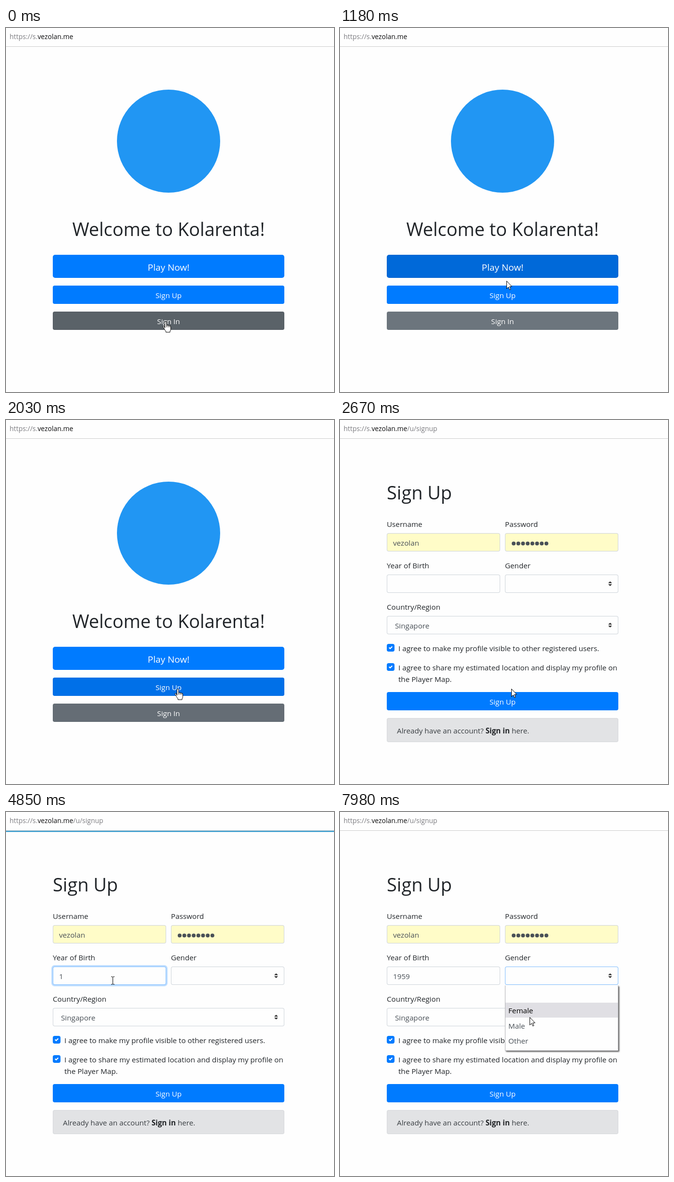
These frames come from a looping animation (680 by 756 pixels, 8000 ms). An HTML page with a canvas:

```html
<!DOCTYPE html>
<html lang="en">
<head>
<meta charset="utf-8">
<title>Sign up</title>
<style>
html, body { margin: 0; width: 100%; height: 100%; overflow: hidden; background: #fefefe; }
canvas { display: block; }
</style>
</head>
<body>
<canvas id="stage" width="680" height="756"></canvas>
<script>
const ctx = document.getElementById('stage').getContext('2d');
const LOOP = 8000, TICK = 90.9;
const PAGE2 = 2490, PRESS = 2400, FOCUS = 3780, OPEN = 7070;
const INK = '#212529', FIELD_INK = '#495057', BORDER = '#ced4da', BLUE = '#007bff';
const BODY = 15.22;

// Pointer hot spot: time, x, y
const PATH = [
  [0, 330, 609], [90, 331, 600], [270, 334, 510], [450, 338, 397], [640, 340, 405],
  [820, 341, 459], [1000, 343, 484], [1180, 345, 525], [1364, 349, 569], [1545, 349, 569],
  [1727, 352, 612], [1818, 354, 600], [1909, 355, 568], [2000, 355, 558], [3180, 355, 558],
  [3455, 300, 470], [3727, 213, 345], [4000, 212, 346], [4640, 221, 350], [6380, 221, 350],
  [6640, 300, 346], [6870, 362, 344], [7180, 362, 344], [7520, 391, 440], [7720, 391, 440],
  [7980, 394, 421]
];
const TYPED = [[4850, '1'], [5040, '9'], [5400, '5'], [5670, '9']];
const CARET = [[3870, 4400], [5130, 5400], [5490, 5940]];
const PRIMARY = { idle: [0, 123, 255], hot: [0, 105, 217], edge: [0, 98, 204] };
const SECONDARY = { idle: [108, 117, 125], hot: [90, 98, 104], edge: [84, 91, 98] };
const BUTTONS = [
  { y: 471, h: 48, label: 'Play Now!', base: 504, size: 19, tint: PRIMARY },
  { y: 535, h: 38, label: 'Sign Up', base: 561, size: BODY, tint: PRIMARY },
  { y: 589, h: 38, label: 'Sign In', base: 615, size: BODY, tint: SECONDARY }
];

const ARROW = new Path2D('M.5 .5V16.5L4.2 13L6.7 18.6L9 17.6L6.6 12H11.4Z');
const HAND = new Path2D('M-.5 14V2.2a1.7 1.7 0 0 1 3.4 0V8.5q1.6-1.2 3.3.4q1.6-1 3.1.5q2.2-.4 2.2 2v5q0 2.5-1.5 4.5v2h-8.5v-2q-2-2-3-4.5l-3-5q0-2.6 2.3-1.4z');
const KNUCKLES = new Path2D('M2.9 8.5v4M6.2 9v3.5M9.3 9.5v3');
const BEAM = new Path2D('M-3 -8H-1L.5 -7L2 -8H4M.5 -7V7M-3 8H-1L.5 7L2 8H4');
const TICKMARK = new Path2D('M6.564 .75l-3.59 3.612-1.538-1.55L0 4.26 2.974 7.25 8 2.193z');
const SORT = new Path2D('M4 0L0 4H8ZM4 10L0 6H8Z');

const clamp = v => Math.max(0, Math.min(1, v));

function pointer(t) {
  t = Math.max(0, Math.floor(t / TICK + 0.02) * TICK);
  let i = 1;
  while (i < PATH.length - 1 && PATH[i][0] < t) i++;
  const a = PATH[i - 1], b = PATH[i], p = clamp((t - a[0]) / (b[0] - a[0]));
  return { x: Math.round(a[1] + (b[1] - a[1]) * p), y: Math.round(a[2] + (b[2] - a[2]) * p) };
}

const over = (b, y) => y >= b.y && y < b.y + b.h;

// Share of a 150 ms window the pointer spent on the button; the page reacts 30 ms late
function hover(b, t) {
  let n = 0;
  for (let k = 0; k < 10; k++) n += over(b, pointer(t - 37.5 - k * 15).y);
  return n / 10;
}

function mix(a, b, k) {
  return `rgb(${a.map((v, i) => Math.round(v + (b[i] - v) * k))})`;
}

function text(s, x, y, color = INK, size = BODY, align = 'left', weight = 400) {
  ctx.font = `${weight} ${size}px "Open Sans", "Noto Sans", sans-serif`;
  ctx.textAlign = align;
  ctx.fillStyle = color;
  ctx.fillText(s, x, y);
  return x + ctx.measureText(s).width;
}

function box(x, y, w, h, fill, r = 4) {
  ctx.beginPath();
  ctx.roundRect(x, y, w, h, r);
  ctx.fillStyle = fill;
  ctx.fill();
}

function outline(x, y, w, h, color, fill, r = 4) {
  box(x, y, w, h, color, r);
  box(x + 1, y + 1, w - 2, h - 2, fill, Math.max(0, r - 1));
}

function glyph(path, x, y, color) {
  ctx.save();
  ctx.translate(x, y);
  ctx.fillStyle = color;
  ctx.fill(path);
  ctx.restore();
}

function addressBar(second) {
  let x = text('https://s.', 7.5, 23, '#7c7c80', 13.95);
  x = text('vezolan.me', x, 23, '#0c0c0d', 13.95);
  if (second) text('/u/signup', x, 23, '#7c7c80', 13.95);
  ctx.fillStyle = '#cccccc';
  ctx.fillRect(0, 38, 680, 1);
}

function welcome(t) {
  ctx.beginPath();
  ctx.arc(337, 235, 107, 0, Math.PI * 2);
  ctx.fillStyle = '#2196f3';
  ctx.fill();
  text('Welcome to Kolarenta!', 337, 432, INK, 37.9, 'center');
  BUTTONS.forEach((b, i) => {
    const k = hover(b, t), { idle, hot, edge } = b.tint;
    const pressed = i === 1 && t >= PRESS;
    if (pressed) box(94, b.y - 3, 486, b.h + 6, 'rgba(0,123,255,.5)', 7);
    outline(97, b.y, 480, b.h, mix(idle, edge, k), pressed ? '#0062cc' : mix(idle, hot, k), b.h / 10);
    text(b.label, 337, b.base, '#fff', b.size, 'center');
  });
}

function select(x, y, w, border) {
  outline(x, y, w, 38, border, '#fefefe');
  glyph(SORT, x + w - 21, y + 14, '#333');
}

function yearField(t) {
  const k = t < OPEN ? clamp((t - FOCUS) / 150) : 1 - clamp((t - OPEN) / 150);
  if (k > 0) box(94, 318, 241, 44, `rgba(0,123,255,${0.25 * k})`, 7);
  outline(97, 321, 235, 38, k > 0.5 ? '#80bdff' : BORDER, '#fefefe');
  const year = TYPED.filter(d => t >= d[0]).map(d => d[1]).join('');
  const end = text(year, 110, 347, FIELD_INK);
  if (CARET.some(c => t >= c[0] && t < c[1])) {
    ctx.fillStyle = FIELD_INK;
    ctx.fillRect(Math.round(end), 330, 1, 21);
  }
}

function checkbox(y) {
  box(97, y, 16, 16, BLUE);
  glyph(TICKMARK, 101, y + 4, '#fff');
}

function dropdown(t) {
  ctx.save();
  ctx.shadowColor = 'rgba(0,0,0,.65)';
  ctx.shadowBlur = 3;
  ctx.shadowOffsetX = ctx.shadowOffsetY = 2;
  box(342, 360, 235, 136, '#b4b4b8', 1);
  ctx.restore();
  box(343, 360, 233, 135, '#fefefe', 0);
  const active = Math.max(0, Math.min(3, Math.floor((pointer(t).y - 365) / 31.5)));
  ctx.fillStyle = '#e0dfe4';
  ctx.fillRect(343, Math.round(364.7 + active * 31.5), 233, 31);
  ['', 'Female', 'Male', 'Other'].forEach((s, i) =>
    text(s, 349, Math.round(386.5 + i * 31.5), i === active ? '#000' : FIELD_INK));
}

function signUp(t) {
  const filled = t >= 2580;
  text('Sign Up', 97, 165, INK, 37.9);
  text('Username', 97, 222);
  text('Password', 342, 222);
  for (const x of [97, 342]) outline(x, 235, 235, 38, BORDER, filled ? '#fffcc8' : '#fefefe');
  if (filled) {
    text('vezolan', 110, 261, FIELD_INK);
    ctx.fillStyle = FIELD_INK;
    for (let i = 0; i < 8; i++) {
      ctx.beginPath();
      ctx.arc(360 + i * 9.7, 256.5, 4, 0, Math.PI * 2);
      ctx.fill();
    }
  }
  text('Year of Birth', 97, 308);
  text('Gender', 342, 308);
  yearField(t);
  select(342, 321, 235, t >= OPEN ? '#80bdff' : BORDER);
  text('Country/Region', 97, 394);
  select(97, 407, 480, BORDER);
  text('Singapore', 114, 433, FIELD_INK);
  checkbox(465);
  text('I agree to make my profile visible to other registered users.', 121, 480);
  checkbox(505);
  text('I agree to share my estimated location and display my profile on', 121, 520);
  text('the Player Map.', 121, 544);
  box(97, 565, 480, 38, BLUE);
  text('Sign Up', 337, 591, '#fff', BODY, 'center');
  outline(97, 619, 480, 50, '#d6d8db', '#e2e3e5');
  let x = text('Already have an account? ', 118, 651, '#383d41');
  x = text('Sign in', x, 651, '#202326', BODY, 'left', 700);
  text(' here.', x, 651, '#383d41');
  if (t >= OPEN) dropdown(t);
}

function progress(t) {
  const p = clamp((t - 3400) / 1150);
  const alpha = 1 - clamp((t - 7230) / 270);
  if (!p || !alpha) return;
  const w = 680 * (1 - (1 - p) ** 3);
  ctx.globalAlpha = alpha;
  ctx.fillStyle = '#3399cc';
  ctx.fillRect(0, 39, w, 2);
  ctx.globalAlpha = 0.4 * (1 - clamp((t - 4850) / 640));
  ctx.fillRect(0, 41, w, 1);
  ctx.globalAlpha = 1;
}

function cursor(t) {
  const { x, y } = pointer(t), first = t < PAGE2;
  const beam = first ? y >= 394 && y < 443 : x >= 97 && x < 332 && y >= 321 && y < 359;
  const hand = first && BUTTONS.some(b => over(b, y));
  ctx.save();
  ctx.translate(x, y);
  ctx.lineWidth = 1;
  ctx.strokeStyle = '#000';
  ctx.fillStyle = '#fff';
  if (beam) {
    ctx.stroke(BEAM);
  } else {
    const shape = hand ? HAND : ARROW;
    ctx.fill(shape);
    ctx.stroke(shape);
    if (hand) ctx.stroke(KNUCKLES);
  }
  ctx.restore();
}

function draw(t) {
  const second = t >= PAGE2;
  ctx.fillStyle = '#fefefe';
  ctx.fillRect(0, 0, 680, 756);
  addressBar(second);
  if (second) signUp(t);
  else welcome(t);
  progress(t);
  cursor(t);
}

const start = performance.now();
function frame() {
  draw((performance.now() - start) % LOOP);
  requestAnimationFrame(frame);
}
frame();
</script>
</body>
</html>
```
